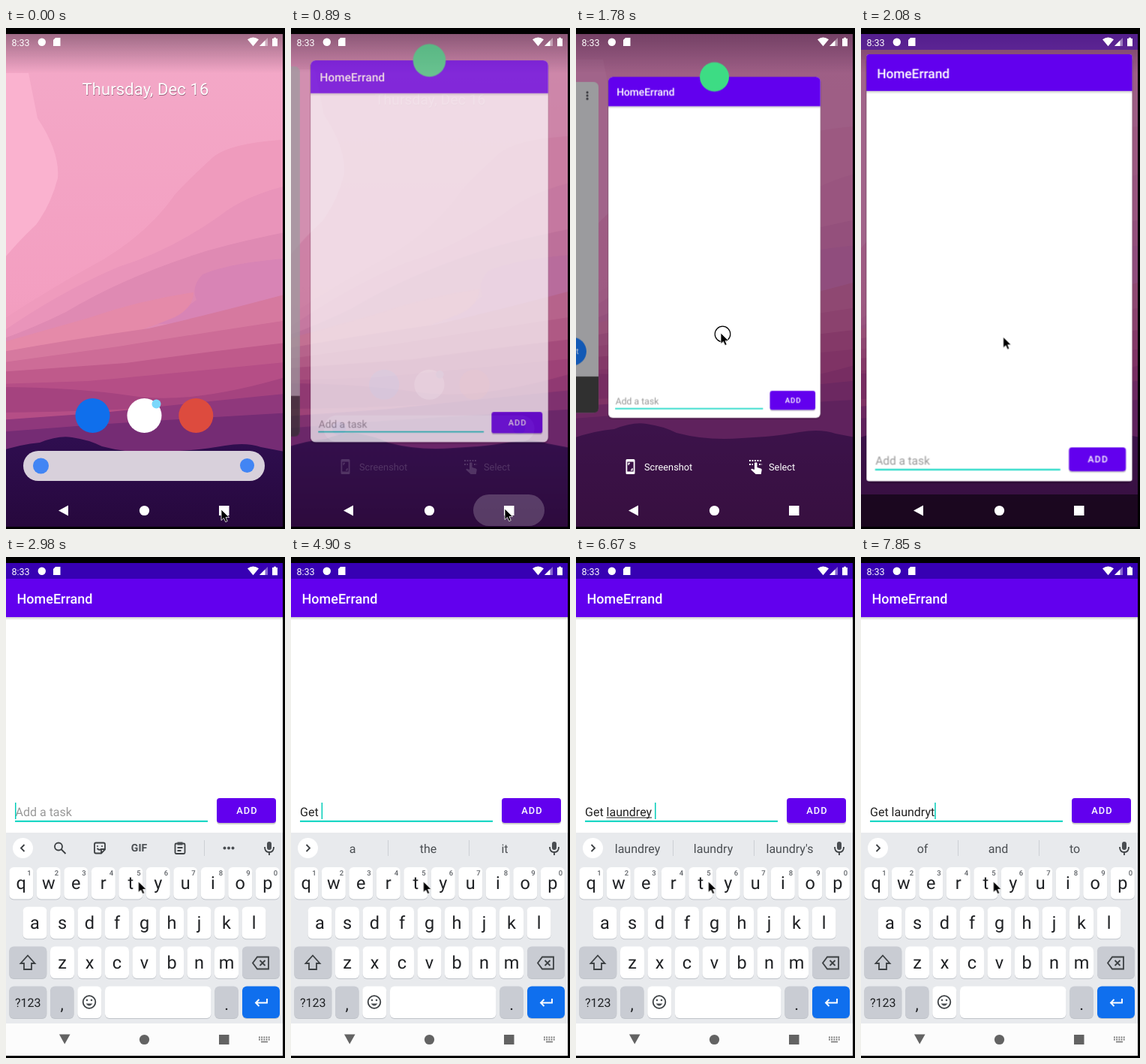
Animation of 372 by 667 pixels, one loop 7.99 s. Source, as an HTML page:

```html
<!DOCTYPE html>
<html lang="en">
<head>
<meta charset="utf-8">
<title>Task list on a phone</title>
<style>
html, body { margin: 0; width: 100%; height: 100%; overflow: hidden; background: #000; }
svg { display: block; width: 372px; height: 667px; font-family: Roboto, "Noto Sans", sans-serif; text-rendering: geometricPrecision; }
text { white-space: pre; }
.mid { text-anchor: middle; }
.line { fill: none; stroke: #3c4043; stroke-width: 1.8; }
.grey { fill: #4a4e52; }

/* Script sets --t (ms); every animation is read at that time. */
.m { animation: 7990ms linear both paused; animation-delay: calc(var(--t, 0) * -1ms); }
#wall { animation-name: wall; }
#scrim { animation-name: scrim; }
#home { animation-name: home; }
#cards { animation-name: cards; }
#corner { animation-name: corner; }
#badge, #side { animation-name: badge; }
#tools { animation-name: tools; }
#bars { animation-name: bars; }
#keys { animation-name: keys; }
#row { animation-name: row; }
#nav { animation-name: nav; }
#press { animation-name: press; }
#mouse { animation-name: mouse; }
#tap { animation-name: tap; animation-timing-function: step-end; }

@keyframes wall { 0%, 9% { transform: translate(0, 0); } 17%, 100% { transform: translate(6px, -18px); } }
@keyframes scrim { 0%, 8% { opacity: 0; } 11.14% { opacity: .45; } 15%, 100% { opacity: 1; } }
@keyframes home {
  0%, 8% { opacity: 1; transform: translate(0, 0) scale(1); }
  11.14% { opacity: .16; transform: translate(23.4px, 24.3px) scale(.873); }
  13%, 100% { opacity: 0; transform: translate(30px, 32px) scale(.84); }
}
@keyframes cards {
  0%, 8% { opacity: 0; transform: translate(9.2px, 6px) scale(.95); }
  11.14% { opacity: .7; transform: translate(26px, 18.1px) scale(.859); }
  14.8% { opacity: 1; transform: translate(40.6px, 39px) scale(.78); }
  16.6%, 23% { opacity: 1; transform: translate(43px, 42.8px) scale(.767); }
  24.16% { transform: translate(33.2px, 32px) scale(.82); }
  26% { transform: translate(7.4px, 7px) scale(.96); }
  27.9%, 100% { opacity: 1; transform: translate(0, 0) scale(1); }
}
@keyframes corner { 0%, 24% { rx: 8px; } 27.9%, 100% { rx: 0; } }
@keyframes badge { 0%, 23% { opacity: 1; } 26%, 100% { opacity: 0; } }
@keyframes tools { 0%, 10.4% { opacity: 0; } 11.14% { opacity: .16; } 15%, 22.4% { opacity: 1; } 24.1%, 100% { opacity: 0; } }
@keyframes bars { 0%, 24% { opacity: 0; } 27.9%, 100% { opacity: 1; } }
@keyframes keys { 0%, 28.5% { transform: translateY(254px); } 31.5%, 100% { transform: translateY(0); } }
@keyframes row { 0%, 29% { transform: translateY(253px); } 31.5%, 100% { transform: translateY(0); } }
@keyframes nav { 0%, 28.5% { opacity: 0; } 31%, 100% { opacity: 1; } }
@keyframes press { 0%, 8.4% { opacity: 0; } 9.2%, 11.2% { opacity: .2; } 14%, 100% { opacity: 0; } }
@keyframes mouse {
  0%, 3.5% { transform: translate(287px, 641px); }
  3.6%, 13% { transform: translate(285px, 640px); animation-timing-function: ease-in-out; }
  20.4%, 25% { transform: translate(193px, 406px); }
  30%, 100% { transform: translate(176.5px, 432px); }
}
@keyframes tap { 0% { opacity: 0; } 22.2% { opacity: 1; } 24.1%, 100% { opacity: 0; } }
</style>
</head>
<body>
<svg viewBox="0 0 372 667">
  <defs>
    <clipPath id="screen"><rect y="8" width="369" height="656"/></clipPath>
    <clipPath id="window"><rect id="corner" class="m" y="29" width="369" height="592"/></clipPath>
    <linearGradient id="sky" x1="0" y1="0" x2="0" y2="1">
      <stop offset="0" stop-color="#f3a9c8"/><stop offset=".5" stop-color="#f39fc1"/>
      <stop offset="1" stop-color="#e58fae"/>
    </linearGradient>
    <linearGradient id="night" x1="0" y1="0" x2="0" y2="1">
      <stop offset="0" stop-color="#2f0e50"/><stop offset="1" stop-color="#240637"/>
    </linearGradient>
    <linearGradient id="shade" x1="0" y1="0" x2="0" y2="1">
      <stop offset="0" stop-color="#4b2c44" stop-opacity=".5"/><stop offset="1" stop-color="#4b2c44" stop-opacity="0"/>
    </linearGradient>
    <linearGradient id="drop" x1="0" y1="0" x2="0" y2="1">
      <stop offset="0" stop-opacity=".2"/><stop offset="1" stop-opacity="0"/>
    </linearGradient>
  </defs>
  <rect width="372" height="667"/>
  <g clip-path="url(#screen)">
    <g id="wall" class="m">
      <rect x="-10" width="392" height="700" fill="url(#sky)"/>
      <path d="M-10 60H30L42 120Q72 165 69 200Q60 235 40 262Q15 285 -10 316Z" fill="#fab2cf"/>
      <path d="M382 148Q300 152 276 172Q240 205 225 222Q190 272 130 308Q60 346 -10 392V700H382Z" fill="#ef9bbd"/>
      <path d="M382 208Q320 222 285 250Q220 296 150 318Q70 352 -10 408V700H382Z" fill="#e994ba"/>
      <path d="M382 270Q320 282 270 296Q160 330 80 378Q40 398 -10 416V700H382Z" fill="#df8ab3"/>
      <path d="M382 306Q300 312 262 328Q246 345 254 362Q225 384 190 394H382Z" fill="#d884b5"/>
      <path d="M250 352Q180 362 110 386L-10 420V448Q130 425 225 385Q250 372 250 352Z" fill="#e58aa9"/>
      <path d="M382 352Q270 382 190 400Q90 414 -10 432V700H382Z" fill="#d6799f"/>
      <path d="M382 388Q250 408 150 424L-10 446V700H382Z" fill="#cd6c97"/>
      <path d="M382 418Q260 432 160 446L-10 458V700H382Z" fill="#bf5a8b"/>
      <path d="M382 444Q220 460 110 470L-10 474V700H382Z" fill="#b54e86"/>
      <path d="M-10 478Q90 478 170 490T382 462V490Q200 510 -10 512Z" fill="#a5437f"/>
      <path d="M382 486Q240 500 130 512L-10 522V700H382Z" fill="#8f387c"/>
      <path d="M382 512Q240 520 120 528L-10 538V700H382Z" fill="#752c74"/>
      <path d="M-10 564Q20 554 45 552Q70 542 88 545Q110 548 128 557Q170 568 215 564Q260 562 292 556Q320 551 340 558L382 566V700H-10Z" fill="url(#night)"/>
    </g>
    <rect y="8" width="369" height="52" fill="url(#shade)"/>
    <rect id="scrim" class="m" width="372" height="667" fill="#4b1946" fill-opacity=".5"/>

    <g id="home" class="m">
      <text x="186.4" y="90" class="mid" font-size="22" letter-spacing=".1" fill="#4a2038" opacity=".5">Thursday, Dec 16</text>
      <text x="186" y="89" class="mid" font-size="22" letter-spacing=".1" fill="#fff">Thursday, Dec 16</text>
      <circle cx="115.5" cy="516" r="23" fill="#0f6fec"/>
      <circle cx="184.5" cy="516" r="23" fill="#fff"/>
      <circle cx="200.5" cy="500.5" r="6" fill="#7bd8fb"/>
      <circle cx="253.3" cy="516" r="23" fill="#dd4b3e"/>
      <rect x="23" y="563" width="322" height="40" rx="20" fill="#d8d0db"/>
      <circle cx="46.5" cy="583" r="10.5" fill="#4285f4"/>
      <circle cx="321.5" cy="582.5" r="9.5" fill="#4285f4"/>
    </g>

    <g id="tools" class="m" fill="#fff">
      <path d="M68 574h9q1.500 0 1.500 1.500v17q0 1.500-1.500 1.500h-9q-1.500 0-1.500-1.500v-17q0-1.500 1.500-1.500zM68.300 577.500v13h8.400v-13z" fill-rule="evenodd"/>
      <path d="M70 582v-2.500h2M75 586v2.500h-2" fill="none" stroke="#fff" stroke-width="1.300"/>
      <text x="91" y="589" font-size="12.800">Screenshot</text>
      <path d="M231 576h17M231 581h5M244 581h4" stroke="#fff" stroke-width="1.800" stroke-dasharray="2 1.500"/>
      <path d="M238 579q2-1.500 3.500 0v6l5 1.500q1.500.5 1.200 2l-1 5.500h-7l-6.500-6 1-1.200 3.800 1.200z"/>
      <text x="257" y="589" font-size="12.800">Select</text>
    </g>

    <g id="cards" class="m">
      <g id="side" class="m">
        <rect x="-330" y="38" width="313" height="574" rx="8" fill="#9b9b9e"/>
        <path d="M-330 549H-17V604Q-17 612 -25 612H-330Z" fill="#303030"/>
        <g fill="#35353a"><circle cx="-36.500" cy="56" r="2"/><circle cx="-36.500" cy="61.500" r="2"/><circle cx="-36.500" cy="67" r="2"/></g>
        <rect x="-130" y="481" width="92" height="49" rx="24.500" fill="#1259b5"/>
        <text x="-56" y="510" font-size="14" fill="#c8cedb">t</text>
      </g>
      <rect x="-1" y="30" width="371" height="594" rx="9" opacity=".18"/>
      <g clip-path="url(#window)">
        <rect y="29" width="369" height="592" fill="#fff"/>
        <rect y="80" width="369" height="4" fill="url(#drop)"/>
        <rect y="29" width="369" height="51" fill="#6200ee"/>
        <text x="14.500" y="62" font-size="18" font-weight="500" fill="#fff">HomeErrand</text>
        <g id="row" class="m">
          <text id="hint" x="12.500" y="345" font-size="16" fill="#989898">Add a task</text>
          <text id="entry" x="12" y="345" font-size="16" fill="#212121"></text>
          <rect id="under" y="346.500" height="1" fill="#212121"/>
          <rect id="caret" y="327" width="1.500" height="22" fill="#03cdb9"/>
          <rect x="12" y="350.800" width="257" height="2" fill="#03d3bf"/>
          <rect x="281" y="323" width="79" height="33" rx="4" opacity=".2"/>
          <rect x="281" y="321" width="79" height="33" rx="4" fill="#6200ee"/>
          <text x="321.500" y="342.300" class="mid" font-size="12.800" font-weight="500" letter-spacing="1.100" fill="#fff">ADD</text>
        </g>
        <g id="keys" class="m">
          <rect y="367" width="369" height="254" fill="#e8eaed"/>
          <circle cx="22.500" cy="387.500" r="13.500" fill="#fff"/>
          <path id="chevron" class="line"/>
          <g id="strip">
            <circle cx="70" cy="385.500" r="5" class="line"/><path d="M73.500 389l6 6" class="line" stroke-width="2.200"/>
            <path d="M120 380.500h10q2 0 2 2v7l-5 5h-7q-2 0-2-2v-10q0-2 2-2zM127 394v-5h5" class="line"/>
            <path d="M121.500 388q3 3 5 1" class="line"/><circle cx="122" cy="385" r="1.100" class="grey"/><circle cx="128" cy="385" r="1.100" class="grey"/>
            <text x="177.500" y="392.300" class="mid grey" font-size="14" font-weight="700">GIF</text>
            <rect x="225.500" y="381.500" width="13" height="13.500" rx="1.500" class="line"/>
            <path d="M228.500 379.500h7v4h-7z" class="grey"/><path d="M228.500 387h7M228.500 391h5" class="line" stroke-width="1.500"/>
            <path d="M264.500 377v21" stroke="#cdd0d4"/>
            <g class="grey"><circle cx="291.500" cy="387.500" r="2"/><circle cx="297" cy="387.500" r="2"/><circle cx="302.500" cy="387.500" r="2"/></g>
          </g>
          <g id="words" font-size="16" fill="#4a4e52" class="mid">
            <path d="M129.500 377v21M237.500 377v21" stroke="#cdd0d4"/>
            <text x="82" y="394"></text><text x="183" y="394"></text><text x="285" y="394"></text>
          </g>
          <rect x="348" y="379" width="6" height="11" rx="3" class="grey"/>
          <path d="M345 386q0 7 6 7t6-7M351 393v4" class="line"/>
          <g id="board"></g>
          <path d="M29 530.500L38.500 541H34V549H24V541H19.500Z" class="line"/>
          <path d="M329 540.500L335 532.500H350V548.500H335ZM338.500 537l7 7m0-7l-7 7" class="line"/>
          <circle cx="111" cy="592.500" r="8.300" class="line" stroke-width="1.600"/>
          <circle cx="108" cy="590" r="1.300" class="grey"/><circle cx="114" cy="590" r="1.300" class="grey"/>
          <path d="M106.500 594.500q4.500 6 9 0z" class="grey"/>
          <path d="M348 588v5.500h-15m4.500-4.500l-4.500 4.500 4.500 4.500" fill="none" stroke="#fff" stroke-width="1.900"/>
        </g>
      </g>
      <circle id="badge" class="m" cx="184.500" cy="29" r="25.400" fill="#3ddc84"/>
    </g>

    <g id="bars" class="m">
      <rect y="8" width="369" height="21" fill="#3700b3"/>
      <rect y="621" width="369" height="43"/>
    </g>
    <g fill="#fff">
      <text x="7.500" y="23.500" font-size="12.500">8:33</text>
      <circle cx="47.800" cy="18.800" r="5.200"/>
      <path d="M66 13h6.500v11h-9.500v-8z"/>
      <path d="M329.500 24.300L322 15.200Q329.500 9.800 337 15.200Z"/>
      <path d="M338 24H349V13Z" opacity=".4"/><path d="M338 24H345.500V16.500Z"/>
      <path d="M355 14h2v-1.300h3V14h2v10.300h-7z"/>
      <rect id="press" class="m" x="243" y="621" width="95" height="42" rx="21"/>
      <path d="M70 642.500L83 635.500V649.500Z"/>
      <circle cx="184.500" cy="642.500" r="6.600"/>
      <rect x="284" y="636" width="13.500" height="13"/>
    </g>
    <g id="nav" class="m" fill="#636363">
      <rect y="621" width="369" height="43" fill="#fcfcfc"/>
      <path d="M71 635.500H85.500L78.200 648.500Z"/>
      <circle cx="184.500" cy="642.500" r="6.600"/>
      <rect x="284" y="636" width="13.500" height="13"/>
      <path d="M337 639.500h15M337 642.500h15" stroke="#777" stroke-width="1.800" stroke-dasharray="1.800 1.400"/>
      <path d="M340 645.500h9" stroke="#777" stroke-width="1.600"/>
    </g>
    <circle id="tap" class="m" cx="195.500" cy="407.500" r="10.300" fill="none" stroke="#000" stroke-width="1.200"/>
    <path id="mouse" class="m" d="M0 0V14.500L3.400 11.400 5.700 16.600 8.200 15.500 6 10.400H10.600Z" stroke="#fff" stroke-width=".8"/>
  </g>
</svg>
<script>
const LOOP = 7990;
const $ = id => document.getElementById(id);
const pen = document.createElement('canvas').getContext('2d');
pen.font = '16px Roboto, "Noto Sans", sans-serif';
const width = s => pen.measureText(s).width;

// Keyboard
const key = (x, y, w, label = '', fill = '#fff', size = 23.5, drop = 8) =>
  `<rect x="${x}" y="${y + 1}" width="${w}" height="42.500" rx="6" fill="#bfc3c9"/>` +
  `<rect x="${x}" y="${y}" width="${w}" height="42.500" rx="6" fill="${fill}"/>` +
  `<text x="${x + w / 2}" y="${y + 21 + drop}" class="mid" font-size="${size}" fill="#1f2124">${label}</text>`;
const rowOf = (letters, x, y) => [...letters].map((c, i) => key(x + i * 36.5, y, 32, c)).join('');
const dark = '#c9ccd3';
const digits = [...'1234567890'].map((d, i) =>
  `<text x="${31 + i * 36.5}" y="423.500" class="mid" font-size="9.500" font-weight="500" fill="#5f6368">${d}</text>`).join('');
$('board').innerHTML =
  rowOf('qwertyuiop', 4.3, 413) + digits + rowOf('asdfghjkl', 22.5, 465.7) + rowOf('zxcvbnm', 59, 518.5) +
  key(4.3, 518.5, 50, '', dark) + key(315, 518.5, 50, '', dark) +
  key(4.3, 571.5, 50, '?123', dark, 16, 6) + key(59, 571.5, 31.5, ',', dark, 22, 10) + key(95.3, 571.5, 32) +
  key(132, 571.5, 141.5) + key(278.3, 571.5, 31.5, '.', dark, 22, 10) + key(315, 571.5, 50, '', '#0f6fee');

// Moments at which moving parts are redrawn
const beats = [0, 290, 740, 890, 1040, 1190, 1330, 1480, 1630, 1780, 1930, 2080, 2230, 2380, 2530];
// time, text, suggestions, underlined part
const edits = [
  [0, '', ''],
  [4450, 'G', 'G|Good|Go', 'G'],
  [4600, 'Ge', 'Ge|Get|Gets', 'Ge'],
  [4750, 'Get', 'Get|Gets|Got', 'Get'],
  [4900, 'Get ', 'a|the|it'],
  [5340, 'Get l', 'l|lost|let', 'l'],
  [5490, 'Get la', 'la|last|late', 'la'],
  [5630, 'Get lau', 'lau|laugh|launch', 'lau'],
  [5780, 'Get laun', 'laun|launch|laundry', 'laun'],
  [6070, 'Get laund', 'laund|laundry|laundromat', 'laund'],
  [6220, 'Get laundr', 'laundr|laundry|laundromat', 'laundr'],
  [6370, 'Get laundre', 'laundre|laundry|laundered', 'laundre'],
  [6520, 'Get laundrey', "laundrey|laundry|laundry's", 'laundrey'],
  [6670, 'Get laundrey ', "laundrey|laundry|laundry's", 'laundrey'],
  [6820, 'Get laundrey', "laundrey|laundry|laundry's", 'laundrey'],
  [6970, 'Get laundre', 'laundre|laundry|laundered', 'laundre'],
  [7110, 'Get laundr', 'laundr|laundry|laundromat', 'laundr'],
  [7260, 'Get laundry', "laundry|laundry's|laundromat", 'laundry'],
  [7410, 'Get laundry', "laundry|laundry's|laundromat", 'laundry'],
  [7560, 'Get laundry ', 'of|and|to', 'laundry'],
  [7850, 'Get laundryt', 'of|and|to']
];
const blinks = [2980, 3420, 3860, 4160, 4450];
const show = (el, on) => el.setAttribute('visibility', on ? 'inherit' : 'hidden');
const slots = $('words').querySelectorAll('text');

function draw(t) {
  document.documentElement.style.setProperty('--t', beats.filter(b => b <= t).pop());
  const [, text, words, mark = ''] = edits.filter(e => e[0] <= t).pop();
  $('entry').textContent = text;
  show($('hint'), !text);
  show($('strip'), !text);
  show($('words'), text);
  words.split('|').forEach((w, i) => slots[i].textContent = w);
  $('chevron').setAttribute('d', text ? 'M20.500 383l4.500 4.500-4.500 4.500' : 'M24.500 383l-4.500 4.500 4.500 4.500');
  $('under').setAttribute('x', 12 + width(text.slice(0, text.lastIndexOf(mark))));
  $('under').setAttribute('width', width(mark));
  $('caret').setAttribute('x', 12 + width(text));
  show($('caret'), blinks.filter(b => b <= t).length % 2);
}

let start;
function tick(now) {
  start ??= now;
  draw((now - start) % LOOP);
  requestAnimationFrame(tick);
}
draw(0);
requestAnimationFrame(tick);
</script>
</body>
</html>
```
